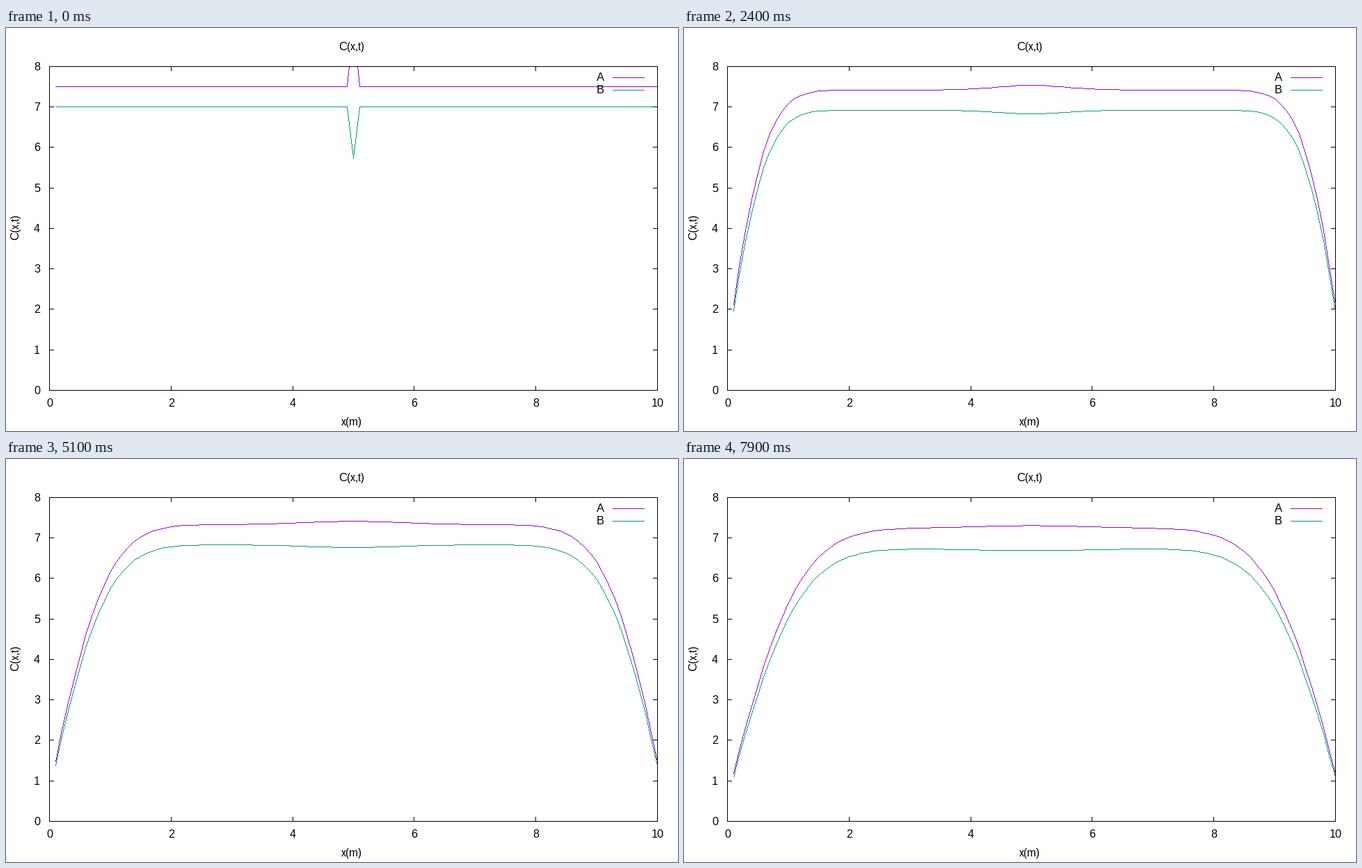
A matplotlib script for the animation above (8000 ms loop, 966 by 580 pixels).

```python
import math

import matplotlib.pyplot as plt
import numpy as np
from matplotlib.animation import FuncAnimation

W, H, DPI = 966, 580, 100
LEFT, RIGHT, TOP, BOTTOM = 62, 936, 55, 521
TICK = 6
FRAMES, INTERVAL = 80, 100
BLACK, PURPLE, GREEN = (0, 0, 0), (148, 0, 211), (0, 158, 115)

plt.rcParams["font.family"] = "Liberation Sans"
plt.rcParams["text.hinting"] = "native"
plt.rcParams["text.hinting_factor"] = 1

fig = plt.figure(figsize=(W / DPI, H / DPI), dpi=DPI, facecolor="white")

erf = np.vectorize(math.erf)
x = np.arange(1, 101) / 10


def nearest(v):
    return np.floor(np.asarray(v) + 0.5).astype(int)


def to_px(xv, yv):
    """Data values to whole pixels."""
    return (LEFT + nearest(np.asarray(xv) * (RIGHT - LEFT) / 10),
            BOTTOM - nearest(np.asarray(yv) * (BOTTOM - TOP) / 8))


def stroke(img, xs, ys, color):
    """Polyline one pixel wide, without smoothing."""
    for x0, y0, x1, y1 in zip(xs[:-1], ys[:-1], xs[1:], ys[1:]):
        n = max(abs(x1 - x0), abs(y1 - y0), 1)
        s = np.arange(n + 1) / n
        px, py = nearest(x0 + s * (x1 - x0)), nearest(y0 + s * (y1 - y0))
        inside = py >= TOP
        img[py[inside], px[inside]] = color


def label(px, py, text, ha="center", rotation=0):
    fig.text(px / W, 1 - py / H, text, fontsize=16 * 72 / DPI, ha=ha,
             va="baseline", rotation=rotation, rotation_mode="anchor")


def profile(level, pulse, k):
    """Plateau draining at both walls, with a spreading pulse at x = 5."""
    if k == 0:
        return np.where(np.abs(x - 5) < 0.01, level + pulse, level)
    spread = 0.0058 * k + 0.0125 * (1 - math.exp(-k / 2))
    width = 2 * math.sqrt(spread)
    walls = erf((x + 0.1) / width) * erf((10.2 - x) / width)
    bump = 0.1 * pulse / math.sqrt(4 * math.pi * spread)
    return (level - 0.0033 * k) * walls + bump * np.exp(-((x - 5) / width) ** 2)


def draw_frame(img):
    stroke(img, [LEFT, RIGHT, RIGHT, LEFT, LEFT],
           [TOP, TOP, BOTTOM, BOTTOM, TOP], BLACK)
    for py in to_px(0, np.arange(1, 8))[1]:
        stroke(img, [LEFT, LEFT + TICK], [py, py], BLACK)
        stroke(img, [RIGHT - TICK, RIGHT], [py, py], BLACK)
    for px in to_px(np.arange(2, 10, 2), 0)[0]:
        stroke(img, [px, px], [TOP, TOP + TICK], BLACK)
        stroke(img, [px, px], [BOTTOM - TICK, BOTTOM], BLACK)


for v in range(9):
    label(49, to_px(0, v)[1] + 6, str(v), ha="right")
for v in range(0, 11, 2):
    label(to_px(v, 0)[0] + 0.5, 545, str(v))
label(497, 32, "C(x,t)")
label(497, 572, "x(m)")
label(18, 287, "C(x,t)", rotation=90)

# Name, level, pulse height, colour, key row
series = [("A", 7.5, 1.6, PURPLE, 71), ("B", 7.0, -1.27, GREEN, 89)]
for name, *_, row in series:
    label(860, row + 5, name, ha="right")

blank = np.full((H, W, 3), 255, np.uint8)
picture = fig.figimage(blank, zorder=-1)


def update(k):
    img = blank.copy()
    for _, level, pulse, color, row in series:
        stroke(img, *to_px(x, profile(level, pulse, k)), color)
        stroke(img, [872, 917], [row, row], color)
    draw_frame(img)
    picture.set_data(img)
    return [picture]


anim = FuncAnimation(fig, update, frames=FRAMES, interval=INTERVAL,
                     repeat=True, repeat_delay=0, blit=False)
plt.show()
```
